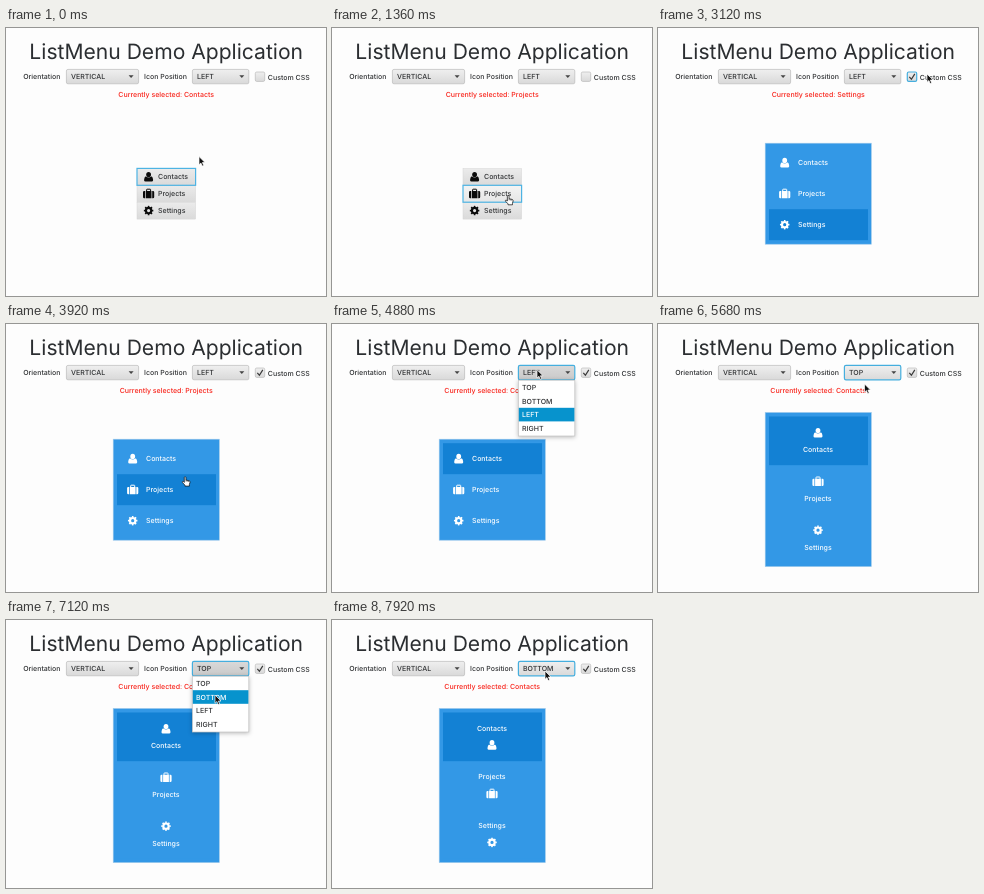
An HTML page that plays this animation: 320 by 268 pixels, repeating every 8 s.

```html
<!DOCTYPE html>
<html lang="en">
<head>
<meta charset="utf-8">
<title>ListMenu Demo Application</title>
<style>
  html, body { margin: 0; width: 100%; height: 100%; overflow: hidden; background: #fdfdfd; }
  svg { display: block; width: 100vw; height: 100vh; }
  text { font: 500 7px Inter, "Open Sans", sans-serif; fill: #303234; text-rendering: geometricPrecision; }
  .title { font-size: 21.1px; font-weight: 400; fill: #2b2e31; }
  .mid { text-anchor: middle; }
  .status { fill: #f8231a; }
  .box { fill: url(#face); stroke: #bababa; stroke-width: .7; }
  .box.focus { stroke: #45aede; stroke-width: 1.2; }
  .box.open { fill: url(#pressed); }
  .arrow { fill: #444; }
  .tick { fill: none; stroke: #3a3a3a; stroke-width: 1.2; }
  .plain rect { fill: url(#button); stroke: #cfcfcf; stroke-width: .4; }
  .plain .hover rect { fill: url(#light); }
  .plain .chosen rect { fill: url(#button); stroke: #4db3e3; stroke-width: 1.2; }
  .plain .chosen.hover rect { fill: url(#light); }
  .plain .icon { color: #0b0b0b; }
  .styled rect { fill: #3398e6; }
  .styled .chosen rect { fill: #1381d4; }
  .styled text { fill: #fff; }
  .styled .icon { color: #fff; }
  .styled .panel { stroke: #9cc8ec; stroke-width: .6; }
  .list { fill: #fff; stroke: #c4c4c4; stroke-width: .7; filter: drop-shadow(0 1.5px 2px #0004); }
  .bar { fill: #0793cd; }
  .lit { fill: #fff; }
</style>
</head>
<body>
<svg viewBox="0 0 320 268">
  <defs>
    <linearGradient id="face" x2="0" y2="1"><stop stop-color="#efefef"/><stop offset="1" stop-color="#d9d9d9"/></linearGradient>
    <linearGradient id="pressed" x2="0" y2="1"><stop stop-color="#d9d9d9"/><stop offset="1" stop-color="#c9c9c9"/></linearGradient>
    <linearGradient id="button" x2="0" y2="1"><stop stop-color="#ebebeb"/><stop offset="1" stop-color="#dadada"/></linearGradient>
    <linearGradient id="light" x2="0" y2="1"><stop stop-color="#f4f4f4"/><stop offset="1" stop-color="#e6e6e6"/></linearGradient>
    <g id="Contacts" fill="currentColor">
      <ellipse cy="-2.2" rx="2.4" ry="2.7"/>
      <path d="M-3.2 4.8C-4.8 4.8-4.6 3.2-4.3 2-4.1.3-3.4-.2-2.5-.2Q0 1.8 2.5-.2C3.4-.2 4.1.3 4.3 2 4.6 3.2 4.8 4.8 3.2 4.8Z"/>
    </g>
    <g id="Projects" fill="currentColor">
      <path d="M-2.9-2.8H2.9V4.5H-2.9ZM-3.6-2.8V4.5H-4.4Q-5.6 4.5-5.6 3.3V-1.6Q-5.6-2.8-4.4-2.8ZM3.6-2.8V4.5H4.4Q5.6 4.5 5.6 3.3V-1.6Q5.6-2.8 4.4-2.8Z"/>
      <path d="M-2-2.6V-4Q-2-4.5-1.5-4.5H1.5Q2-4.5 2-4V-2.6" fill="none" stroke="currentColor"/>
    </g>
    <g id="Settings" fill="none" stroke="currentColor">
      <circle r="2.7" stroke-width="2.2"/>
      <circle r="4" stroke-width="1.5" pathLength="16" stroke-dasharray="1" stroke-dashoffset=".5"/>
    </g>
  </defs>

  <text class="title mid" x="160.2" y="30.7">ListMenu Demo Application</text>
  <text x="17.2" y="51.3">Orientation</text>
  <rect class="box" x="60.4" y="41.4" width="72.2" height="14.4" rx="1.6"/>
  <text x="65" y="51.3">VERTICAL</text>
  <path class="arrow" d="M122.6 47.3h5l-2.5 2.7z"/>
  <text x="138" y="51.3">Icon Position</text>
  <rect class="box" id="combo" x="186.4" y="41.4" width="56.4" height="14.4" rx="1.6"/>
  <text id="value" x="191" y="51.3"></text>
  <path class="arrow" d="M233.3 47.3h5l-2.5 2.7z"/>
  <rect class="box" id="check" x="249.3" y="44" width="9.4" height="9.4" rx="1.4"/>
  <path class="tick" id="tick" d="M251.3 48.9l2.1 2.3 3.4-5.3"/>
  <text x="261.8" y="51.7">Custom CSS</text>
  <text class="status mid" id="status" x="160.2" y="68.6"></text>

  <g id="menu"><rect class="panel" id="panel" x="107.2" width="106.1"/></g>

  <g id="popup">
    <rect class="list" x="186.4" y="56.2" width="56.4" height="55.8"/>
    <rect class="bar" id="bar" x="186.8" width="55.6" height="13.6"/>
  </g>

  <g id="cursor" stroke-linejoin="round">
    <path id="pointer" d="M0 0V8.3L1.9 6.5 3.2 9.6 4.7 9 3.4 6H6Z" fill="#111" stroke="#fff" stroke-width=".7"/>
    <g id="hand" fill="#fff" stroke="#111" stroke-width=".8" transform="scale(.93)">
      <path d="M-1 .8C-1-.3.8-.3.8.8V3.5L4.4 4.3Q5.3 4.6 5.2 5.8L4.5 8.3V10H-.3V9L-3 6.1C-3.5 5-2.4 4.5-1.8 5.2L-1 6Z"/>
      <path d="M.8 3.5V5.2M2.2 4V5.4M3.6 4.3V5.6" stroke-width=".5"/>
    </g>
  </g>
</svg>
<script>
const LOOP = 8000, STEP = 160, LEAD = 80;
const items = ["Contacts", "Projects", "Settings"];
const sides = ["TOP", "BOTTOM", "LEFT", "RIGHT"];
const ROW = 13.6, LIST_TOP = 56.6;

// time, x, y of the pointer tip
const path = [
  [0, 193, 128.5], [240, 193, 128.5], [880, 180, 161], [1360, 176.3, 167.5],
  [1680, 177, 184], [1840, 177, 184], [2480, 268.5, 46.5], [2640, 269, 46],
  [3200, 269, 46], [3760, 182, 155], [3920, 179.2, 152.8], [4240, 176, 133],
  [4400, 176, 133], [4720, 205, 46], [5040, 205, 45.5], [5520, 206, 61],
  [5840, 207, 59], [6320, 208, 49], [6640, 208, 49], [7120, 209, 75],
  [7280, 209, 75], [7760, 213, 51], [8000, 213, 51]
];

// what each click changes
const clicks = [
  [0, { item: 0, side: 2, css: false, open: false, focus: "menu" }],
  [1200, { item: 1 }],
  [1680, { item: 2 }],
  [2640, { css: true, focus: "check" }],
  [3920, { item: 1, focus: "menu" }],
  [4240, { item: 0 }],
  [4880, { open: true, focus: "combo" }],
  [5680, { open: false, side: 0 }],
  [6640, { open: true }],
  [7280, { open: false, side: 1 }]
];

const $ = id => document.getElementById(id);
function add(parent, tag, attrs = {}, label = "") {
  const el = document.createElementNS("http://www.w3.org/2000/svg", tag);
  set(el, attrs);
  el.textContent = label;
  return parent.appendChild(el);
}
function set(el, attrs) {
  for (const key in attrs) el.setAttribute(key, attrs[key]);
}
const show = (id, on) => { $(id).style.display = on ? "" : "none"; };

const rows = items.map(name => {
  const g = add($("menu"), "g");
  return {
    g,
    rect: add(g, "rect"),
    icon: add(g, "use", { href: "#" + name, class: "icon" }),
    text: add(g, "text", {}, name)
  };
});
const options = sides.map((name, i) =>
  add($("popup"), "text", { x: 190, y: LIST_TOP + i * ROW + 9.4 }, name));

function pointerAt(t) {
  const i = path.findIndex(p => p[0] > t);
  const [t0, x0, y0] = path[i - 1], [t1, x1, y1] = path[i];
  const k = (t - t0) / (t1 - t0), e = k * k * (3 - 2 * k);
  return [x0 + (x1 - x0) * e, y0 + (y1 - y0) * e];
}

function layout({ css, side }) {
  if (!css) return { x: 131, y: 140.4, w: 58.6, h: 16.9, iconX: 142.6, textX: 152, iconY: 8.4, textY: 10.9 };
  if (side > 1) return { x: 111, y: 119.2, w: 99, h: 31, iconX: 126.7, textX: 140, iconY: 15.5, textY: 18 };
  const base = { x: 111, y: 92.5, w: 99, h: 48.7, iconX: 160, textX: 160, mid: true };
  return Object.assign(base, side ? { iconY: 32.5, textY: 18 } : { iconY: 16.3, textY: 35.6 });
}

function drawMenu(s, x, y) {
  const m = layout(s), pad = 4;
  const over = x >= m.x && x <= m.x + m.w ? Math.floor((y - m.y) / m.h) : -1;
  set($("menu"), { class: s.css ? "styled" : "plain" });
  show("panel", s.css);
  set($("panel"), { y: m.y - pad, height: m.h * 3 + pad * 2 });
  rows.forEach((r, i) => {
    const top = m.y + i * m.h;
    r.g.classList.toggle("chosen", i === s.item);
    r.g.classList.toggle("hover", i === over);
    set(r.rect, { x: m.x, y: top, width: m.w, height: m.h });
    set(r.icon, { x: m.iconX, y: top + m.iconY });
    set(r.text, { x: m.textX, y: top + m.textY, class: m.mid ? "mid" : "" });
  });
  // keep the focus border above its neighbours
  if ($("menu").lastChild !== rows[s.item].g) $("menu").append(rows[s.item].g);
  return over >= 0 && over < items.length;
}

function drawPopup(s, x, y) {
  show("popup", s.open);
  $("combo").classList.toggle("open", s.open);
  const over = Math.floor((y - LIST_TOP) / ROW);
  const lit = sides[over] ? over : s.side;
  set($("bar"), { y: LIST_TOP + lit * ROW });
  options.forEach((o, i) => set(o, { class: i === lit ? "lit" : "" }));
}

function render(time) {
  const t = time < LEAD ? 0 : LEAD + Math.floor((time - LEAD) / STEP) * STEP;
  const s = Object.assign({}, ...clicks.filter(c => c[0] <= t).map(c => c[1]));
  const [x, y] = pointerAt(t);
  $("value").textContent = sides[s.side];
  $("status").textContent = "Currently selected: " + items[s.item];
  for (const id of ["combo", "check"]) $(id).classList.toggle("focus", s.focus === id);
  show("tick", s.css);
  const onMenu = drawMenu(s, x, y);
  drawPopup(s, x, y);
  show("hand", onMenu);
  show("pointer", !onMenu);
  set($("cursor"), { transform: `translate(${x} ${y})` });
}

const start = performance.now();
function tick() {
  render((performance.now() - start) % LOOP);
  requestAnimationFrame(tick);
}
tick();
</script>
</body>
</html>
```
